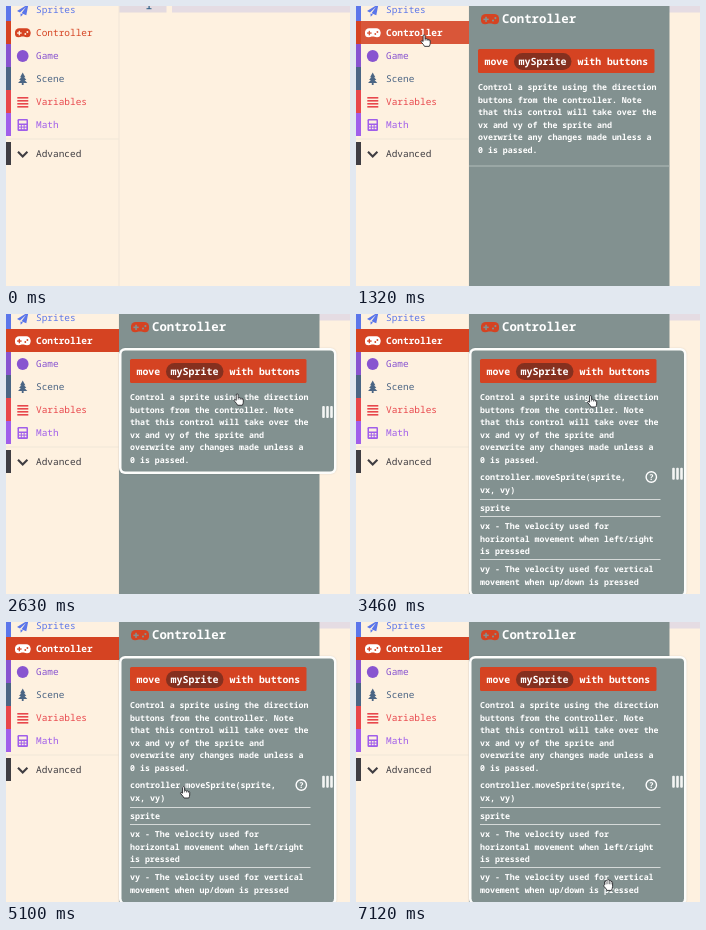
Write an HTML page with a canvas that moves like this. It is 344x280 px and loops after 7590 ms.

```html
<!DOCTYPE html>
<html lang="en">
<head>
<meta charset="utf-8">
<title>Block toolbox</title>
<style>
html, body { margin: 0; width: 100%; height: 100%; overflow: hidden; background: #fef1e0; }
canvas { display: block; width: 344px; height: 280px; }
</style>
</head>
<body>
<canvas id="stage" width="344" height="280"></canvas>
<script>
const ctx = document.getElementById('stage').getContext('2d');
const LOOP = 7590;
const MONO = '"Noto Sans Mono", "DejaVu Sans Mono", monospace';
const CREAM = '#fef1e0', RED = '#d54322', SLATE = '#829190', WHITE = '#fff';

const T = { enter: 70, hover: 630, open: 1320, leave: 1810, card: 1880, expand: 3330, grab: 5840 };

// cursor stops: time, left, top
const path = [
  [70, 312, 268], [210, 262, 228], [420, 150, 92], [770, 68, 27], [1190, 62, 28], [1530, 69, 29],
  [1800, 97, 37], [2300, 204, 67], [2700, 231, 81], [3460, 231, 81], [4120, 231, 81],
  [4400, 253, 100], [4850, 127, 161], [5100, 174, 164], [5510, 178, 169], [5840, 178, 169],
  [5970, 146, 176], [6110, 178, 185], [6520, 204, 214], [7120, 247, 257], [LOOP, 247, 257]
];

const rows = [
  ['Sprites', 4, '#5b76ea', plane],
  ['Controller', 27, RED, gamepad],
  ['Game', 50, '#8854d0', disc],
  ['Scene', 73, '#4b6584', tree],
  ['Variables', 96, '#e8474c', bars],
  ['Math', 119, '#a05eea', calculator],
  ['Advanced', 148, '#3f3d42', chevron]
];

const help = [
  'Control a sprite using the direction',
  'buttons from the controller. Note',
  'that this control will take over the',
  'vx and vy of the sprite and',
  'overwrite any changes made unless a',
  '0 is passed.'
];

const details = [
  ['controller.moveSprite(sprite,', 163, 800],
  ['vx, vy)', 175.5, 800],
  ['sprite', 194, 800],
  ['vx', 212, 800],
  ['   - The velocity used for', 212, 600],
  ['horizontal movement when left/right', 224.7, 600],
  ['is pressed', 237, 600],
  ['vy', 255, 800],
  ['   - The velocity used for vertical', 255, 600],
  ['movement when up/down is pressed', 267.7, 600]
];

function rect(x, y, w, h, color) {
  ctx.fillStyle = color;
  ctx.fillRect(x, y, w, h);
}

function pill(x, y, w, h, r, color) {
  ctx.fillStyle = color;
  ctx.beginPath();
  ctx.roundRect(x, y, w, h, r);
  ctx.fill();
}

function dot(x, y, r, color) {
  ctx.fillStyle = color;
  ctx.beginPath();
  ctx.arc(x, y, r, 0, Math.PI * 2);
  ctx.fill();
}

function poly(points, color) {
  ctx.fillStyle = color;
  ctx.beginPath();
  points.forEach(([x, y]) => ctx.lineTo(x, y));
  ctx.fill();
}

// y is the middle of the capitals
function text(str, x, y, size, color, weight = 400) {
  ctx.font = `${weight} ${size}px ${MONO}`;
  ctx.fillStyle = color;
  ctx.fillText(str, x, y + size * 0.36);
}

function plane(y, c) {
  poly([[22.5, y - 6], [11, y + 1], [14, y + 2.6], [20, y - 3], [15.5, y + 3.2], [20.3, y + 5.2]], c);
  poly([[14.5, y + 3.6], [17, y + 4.6], [14.7, y + 6.8]], c);
}

function gamepad(y, c, back, x = 9, w = 15.5) {
  const k = w / 15;
  ctx.save();
  ctx.translate(x, y);
  ctx.scale(k, k);
  pill(0, -4.5, 15, 8, 4, c);
  dot(3.4, 0.7, 3.4, c);
  dot(11.6, 0.7, 3.4, c);
  rect(2, -0.6, 4.4, 1.3, back);
  rect(3.55, -2.1, 1.3, 4.3, back);
  dot(10, 1, 0.9, back);
  dot(12, -1, 0.9, back);
  ctx.restore();
}

function disc(y, c) { dot(16.7, y, 5.9, c); }

function tree(y, c) {
  for (let i = 0; i < 3; i++) {
    const top = y - 6.5 + i * 2.8, half = 2.6 + i;
    poly([[16.7, top], [16.7 + half, top + 4.8], [16.7 - half, top + 4.8]], c);
  }
  rect(15.8, y + 3, 1.8, 3, c);
}

function bars(y, c) {
  for (let i = 0; i < 4; i++) rect(11.3, y - 5 + i * 3, 11, 1.6, c);
}

function calculator(y, c) {
  pill(11.5, y - 6, 10.5, 12, 1.2, c);
  rect(13, y - 4.5, 7.5, 3, CREAM);
  for (let i = 0; i < 6; i++) rect(13 + i % 3 * 2.8, y + (i < 3 ? 0 : 2.6), 1.8, 1.6, CREAM);
}

function chevron(y, c) {
  ctx.strokeStyle = c;
  ctx.lineWidth = 2.1;
  ctx.beginPath();
  ctx.moveTo(12, y - 2.3);
  ctx.lineTo(16.7, y + 2.4);
  ctx.lineTo(21.4, y - 2.3);
  ctx.stroke();
}

function editor() {
  rect(0, 0, 344, 280, CREAM);
  rect(113, 0, 47.5, 6.5, '#e3dae0');
  rect(166, 0, 178, 6.5, '#e5dce3');
  rect(142.5, 0, 1.2, 3, '#2f5f86');
  rect(140.5, 2.2, 5, 1, '#2f5f86');
}

function sidebar(t) {
  rect(112.5, 0, 1, 280, '#f0e5d8');
  rect(0, 132.5, 113, 1, '#f2e7da');
  rows.forEach(([name, y, color, icon], i) => {
    const top = y - 12;
    const active = i === 1 && t >= T.open;
    let back = CREAM;
    if (active) back = t < T.leave + 40 ? '#d95639' : RED;
    else if (i === 1 && t >= T.hover) back = '#eae5de';
    if (back !== CREAM) rect(0, top, 113, 23, back);
    rect(0, top, 5, 23, color);
    const ink = active ? WHITE : color;
    icon(y, ink, back);
    text(name, 30, y, 9.45, ink, active ? 700 : 400);
  });
}

function block(x, y) {
  pill(x, y, 176.5, 24, 1.5, RED);
  pill(x + 36, y + 4, 57.5, 17, 8.5, '#85301f');
  text('move', x + 6.5, y + 12, 9.8, WHITE, 700);
  text('mySprite', x + 40.5, y + 12, 10, WHITE, 800);
  text('with buttons', x + 99.5, y + 12, 9.8, WHITE, 700);
}

function content(x, y) {
  block(x, y);
  help.forEach((line, i) => text(line, x, y + 38 + i * 12.6, 8.27, WHITE, 600));
}

function card(t) {
  const open = t >= T.expand;
  const bottom = open ? 283 : 160;
  ctx.save();
  ctx.shadowColor = 'rgba(0,0,0,.12)';
  ctx.shadowBlur = 2;
  pill(113, 34, 217.5, bottom - 34, 6, '#fdfdfb');
  ctx.restore();
  pill(115.5, 36.5, 212.5, bottom - 39, 4, SLATE);
  content(124, 45);
  const mid = open ? 159.7 : 98;
  for (let i = 0; i < 3; i++) pill(316.2 + i * 4, mid - 6, 2.6, 12, 1, '#f4f5f4');
  if (!open) return;
  details.forEach(([line, y, weight]) => text(line, 124, y, weight > 600 ? 8.4 : 8.27, WHITE, weight));
  [185, 202, 245].forEach(y => rect(124, y, 180.5, 1, '#d5dad9'));
  ctx.strokeStyle = WHITE;
  ctx.lineWidth = 1.4;
  ctx.beginPath();
  ctx.arc(295.3, 163, 5.2, 0, Math.PI * 2);
  ctx.stroke();
  text('?', 292.9, 163, 8, WHITE, 800);
}

function flyout(t) {
  rect(113, 0, 200.5, 280, SLATE);
  gamepad(13.3, RED, SLATE, 125, 18);
  text('Controller', 146, 13, 12.35, WHITE, 600);
  if (t >= T.card) return card(t);
  content(122, 43);
  rect(113, 159.5, 200.5, 1, '#b4bdbc');
}

const pointer = new Path2D('M2.6 7.2V1.7Q2.6.6 3.6.6T4.6 1.7V4.6Q6 3.9 6.6 5Q8 4.4 8.4 5.6Q9.6 5.2 9.7 6.5V9Q9.6 10.4 8.8 12H4Q3.3 10.4 1 8Q.1 6.9 1 6.4Q1.8 6.2 2.6 7.2Z');
const grab = new Path2D('M1.7 5.6L1.5 3Q1.6 1.7 2.9 2.2Q3.2.6 4.4 1Q5.4.3 6.2 1.3Q7.6.9 7.9 2.3Q9.5 2 9.6 3.6V7.4Q9.4 9.5 8.5 11.4H3.9Q3 9.4 1 7.4Q.2 6.2 1.7 5.6Z');
const knuckles = new Path2D('M4.6 4.6V6.4M6.6 5V6.6M8.4 5.6V6.8');
const fingers = new Path2D('M3.1 2.4V5.4M4.9 1.6V5.2M6.6 1.6V5.2M8.1 2.6V5.4');

function cursorAt(t) {
  const i = path.findIndex(p => p[0] > t);
  const [t0, x0, y0] = path[i - 1], [t1, x1, y1] = path[i];
  const k = (t - t0) / (t1 - t0);
  const e = k + 0.5 * (k * k * (3 - 2 * k) - k);
  return [x0 + (x1 - x0) * e, y0 + (y1 - y0) * e];
}

function cursor(t) {
  const [x, y] = cursorAt(t);
  const holding = t >= T.grab;
  ctx.save();
  ctx.translate(x, y);
  ctx.lineJoin = 'round';
  ctx.fillStyle = WHITE;
  ctx.strokeStyle = '#26282b';
  ctx.lineWidth = 0.9;
  ctx.fill(holding ? grab : pointer);
  ctx.stroke(holding ? grab : pointer);
  ctx.lineWidth = 0.6;
  ctx.stroke(holding ? fingers : knuckles);
  ctx.restore();
}

function draw(t) {
  editor();
  sidebar(t);
  if (t >= T.open) flyout(t);
  if (t >= T.enter) cursor(t);
}

ctx.textRendering = 'geometricPrecision';
const start = performance.now();
function frame() {
  draw((performance.now() - start) % LOOP);
  requestAnimationFrame(frame);
}
frame();
</script>
</body>
</html>
```
